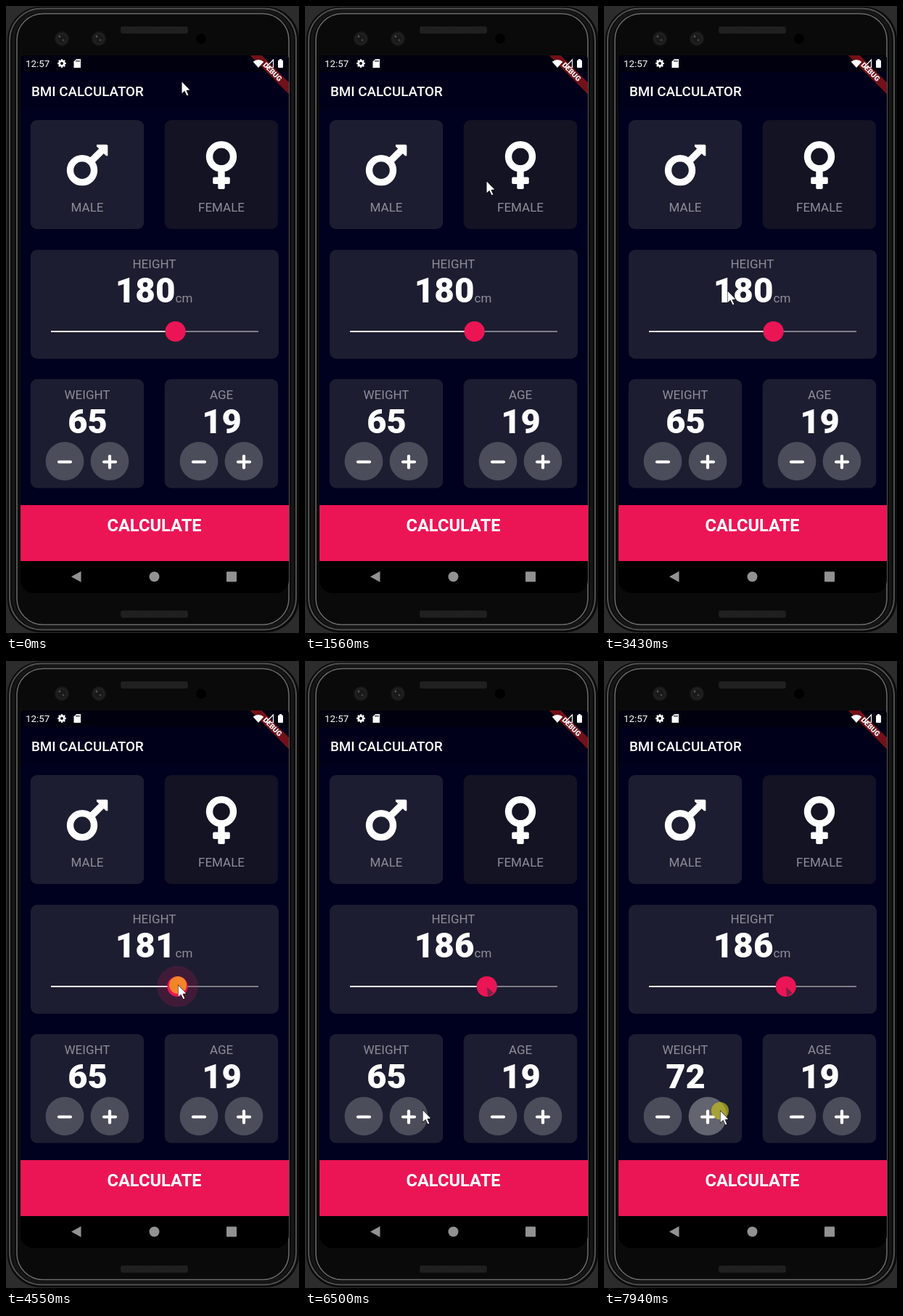
Recreate the animation shown at these times as an HTML page with a canvas. Size 404 px wide and 863 px high, loop 8000 ms.

```html
<!DOCTYPE html>
<html lang="en">
<head>
<meta charset="utf-8">
<title>BMI Calculator</title>
<style>
html, body { margin: 0; width: 100%; height: 100%; overflow: hidden; background: #2c2c2d; }
canvas { display: block; width: 404px; height: 863px; }
</style>
</head>
<body>
<canvas id="stage" width="404" height="863"></canvas>
<script>
const ctx = document.getElementById('stage').getContext('2d');
const LOOP = 8000, TAU = Math.PI * 2;
const PINK = '#eb1555', CARD = '#1d1d31', GREY = '#8d8e98', WHITE = '#fff', BAR = '#00000f';
const LEFT = 112, MID = 204.5, RIGHT = 297;
const TRACK = { from: 62, to: 348, y: 448, min: 120, max: 220 };
const PRESS = 4310, RELEASE = 5790, FIRST_TAP = 6680, TAP_GAP = 190;

// Pointer moves: start time, end time, x, y
const START = [242, 104];
const MOVES = [
  [260, 1090, 121, 232], [1110, 1380, 306, 198], [1380, 1560, 250, 241],
  [1600, 1790, 262, 250], [1900, 2340, 146, 251], [3120, 3430, 170, 392],
  [3430, 3990, 229, 436], [4100, 4240, 232, 446], [4400, 4550, 237, 446],
  [4650, 5100, 247, 447], [5410, 5640, 251, 447], [5960, 6500, 162, 618],
  [6500, 6820, 160, 619]
];

const clamp = v => Math.max(0, Math.min(1, v));
const ease = k => k * k * (3 - 2 * k);

function pointer(t) {
  let [x, y] = START;
  for (const [from, to, nx, ny] of MOVES) {
    const k = ease(clamp((t - from) / (to - from)));
    x += (nx - x) * k;
    y += (ny - y) * k;
  }
  return [Math.round(x), Math.round(y)];
}

function box(x, y, w, h, r, fill) {
  ctx.beginPath();
  ctx.roundRect(x, y, w, h, r);
  ctx.fillStyle = fill;
  ctx.fill();
}

function disc(x, y, r, fill) {
  ctx.beginPath();
  ctx.arc(x, y, r, 0, TAU);
  ctx.fillStyle = fill;
  ctx.fill();
}

function ring(x, y, r, width, color) {
  ctx.beginPath();
  ctx.arc(x, y, r, 0, TAU);
  ctx.lineWidth = width;
  ctx.strokeStyle = color;
  ctx.stroke();
}

function trace(points) {
  ctx.beginPath();
  points.forEach(([x, y]) => ctx.lineTo(x, y));
  ctx.closePath();
}

function poly(points, fill) {
  trace(points);
  ctx.fillStyle = fill;
  ctx.fill();
}

function line(x0, y0, x1, y1, width, color, cap = 'butt') {
  ctx.beginPath();
  ctx.moveTo(x0, y0);
  ctx.lineTo(x1, y1);
  ctx.lineWidth = width;
  ctx.strokeStyle = color;
  ctx.lineCap = cap;
  ctx.stroke();
}

function text(str, x, y, size, weight = 400, color = WHITE, align = 'center') {
  ctx.font = `${weight} ${size}px Roboto, sans-serif`;
  ctx.textAlign = align;
  ctx.fillStyle = color;
  ctx.fillText(str, x, y);
}

const label = (str, x, y) => text(str, x, y, 17, 400, GREY);
const card = (x, y, fill = CARD, w = 156.5) => box(x - w / 2, y, w, 150, 9, fill);

function placed(x, y, scale, paint) {
  ctx.save();
  ctx.translate(x, y);
  ctx.scale(scale, scale);
  paint();
  ctx.restore();
}

function edge(inset, color, width) {
  ctx.beginPath();
  ctx.roundRect(inset, inset * 0.7, 405 - inset * 2, 862 - inset * 1.4, 48 - inset * 0.8);
  ctx.strokeStyle = color;
  ctx.lineWidth = width;
  ctx.stroke();
}

function grille(y) {
  box(158, y, 93, 10, 3, '#1d1d1d');
  for (let x = 160; x < 250; x += 3) line(x, y + 1, x + 2, y + 9, 0.7, '#2b2b2b');
}

function lens(x) {
  disc(x, 45, 10, '#191919');
  ring(x, 45, 7, 1.5, '#242424');
  disc(x - 3, 42, 1.4, '#555');
  disc(x + 2, 47, 1.4, '#444');
}

function phone() {
  ctx.fillStyle = '#2c2c2d';
  ctx.fillRect(0, 0, 404, 863);
  box(2, 1, 402, 861, 46, '#0a0a0a');
  edge(5, '#505050', 2);
  edge(10, '#161616', 4);
  edge(15, '#6c6c6c', 1.5);
  grille(28);
  grille(832);
  lens(77);
  lens(128);
  disc(269, 45, 7, '#000');
  box(20, 68, 370, 740, [5, 5, 18, 18], '#000');
  box(20, 91, 370, 673, 0, '#00001f');
  box(20, 91, 370, 52, 0, '#00001b');
  box(20, 68, 370, 23, [5, 5, 0, 0], BAR);
}

function banner() {
  ctx.save();
  ctx.beginPath();
  ctx.rect(20, 68, 370, 740);
  ctx.clip();
  ctx.translate(390, 68);
  ctx.rotate(Math.PI / 4);
  ctx.fillStyle = 'rgba(183, 28, 28, 0.63)';
  ctx.fillRect(-40, 26.4, 80, 11.3);
  text('DEBUG', 0, 35.3, 10, 900);
  ctx.restore();
}

function statusBar() {
  text('12:57', 27, 83.7, 13.3, 400, WHITE, 'left');
  for (let i = 0; i < 8; i++) {
    const a = i * TAU / 8;
    line(77, 79, 77 + 5.8 * Math.cos(a), 79 + 5.8 * Math.sin(a), 2.4, WHITE);
  }
  disc(77, 79, 4.6, WHITE);
  disc(77, 79, 2, BAR);
  poly([[97, 73], [103, 73], [103, 85], [93.5, 85], [93.5, 76.5]], WHITE);
  for (let x = 97; x < 102; x += 2) line(x, 74.5, x, 77, 1, BAR);
  ctx.beginPath();
  ctx.moveTo(348, 85);
  ctx.arc(348, 85, 11, -TAU * 0.365, -TAU * 0.135);
  ctx.fillStyle = WHITE;
  ctx.fill();
  trace([[358.5, 84.5], [368.5, 74], [368.5, 84.5]]);
  ctx.lineWidth = 1.2;
  ctx.strokeStyle = WHITE;
  ctx.stroke();
  box(375, 74.5, 7, 10.5, 1, WHITE);
  box(377, 73, 3, 2, 0, WHITE);
}

// Both icons live on a 512-unit grid
function maleIcon() {
  ring(144, 304, 112, 64, WHITE);
  line(215, 233, 340, 108, 64, WHITE);
  poly([[280, 64], [376, 64], [384, 72], [384, 168], [368, 168], [280, 80]], WHITE);
}

function femaleIcon() {
  ring(144, 176, 112, 64, WHITE);
  box(112, 300, 64, 180, 12, WHITE);
  box(64, 368, 160, 64, 12, WHITE);
}

function genders() {
  card(LEFT, 157);
  card(RIGHT, 157, '#131324');
  placed(83.8, 181.4, 0.1472, maleIcon);
  placed(275.8, 181.4, 0.1472, femaleIcon);
  label('MALE', LEFT, 283);
  label('FEMALE', RIGHT, 283);
}

function roundButton(x, plus, fill = '#4b4d5a') {
  disc(x, 626.5, 26.4, fill);
  line(x - 8, 627.5, x + 8, 627.5, 4.2, WHITE, 'round');
  if (plus) line(x, 619.5, x, 635.5, 4.2, WHITE, 'round');
}

function counter(x, name, value, plusFill) {
  card(x, 513.5);
  label(name, x, 541);
  text(value, x + 0.4, 588, 47, 900);
  roundButton(x - 31, false);
  roundButton(x + 31, true, plusFill);
}

function slider(t, x) {
  const { from, to, y, min, max } = TRACK;
  const perUnit = (to - from) / (max - min);
  const dragX = t < PRESS ? (from + to) / 2 + perUnit * 10 : x;
  const value = t < PRESS ? 180 : Math.round((dragX - from - 1) / perUnit) + min;
  return { value, thumb: from + (value - min) * perUnit };
}

function heightCard(t, x) {
  const { from, to, y } = TRACK;
  const { value, thumb } = slider(t, x);
  card(MID + 0.5, 335.5, CARD, 342);
  label('HEIGHT', MID, 361);
  text(value, 233.5, 408, 47.6, 900, WHITE, 'right');
  text('cm', 233.5, 408, 17, 400, GREY, 'left');
  line(from, y, to, y, 2, '#7c7d87');
  line(from, y, thumb, y, 2, WHITE);
  const halo = clamp((t - PRESS) / 140) * clamp((RELEASE + 80 - t) / 80);
  disc(thumb, y, 28.3 * halo, 'rgba(235, 21, 85, 0.17)');
  disc(thumb, y, 14.1, PINK);
  if (t >= 6020) poly([[251, 449], [260, 457], [252, 462]], '#7d2044');
}

function cursor() {
  trace([[0.5, 1], [0.5, 15.5], [4, 12.3], [6.9, 18.4], [8.7, 17.5], [6, 11.5], [10.5, 11.2]]);
  ctx.lineWidth = 1;
  ctx.strokeStyle = '#000';
  ctx.stroke();
  ctx.fillStyle = WHITE;
  ctx.fill();
}

function tapMark(t, x, y) {
  const tapping = (t >= 2730 && t < 2880) ||
    (t >= FIRST_TAP && (t - FIRST_TAP) % TAP_GAP < 130);
  if (t >= PRESS && t < RELEASE) disc(x, y, 12, 'rgba(248, 200, 15, 0.63)');
  else if (tapping) disc(x, y, 12, 'rgba(207, 198, 20, 0.63)');
}

function navBar() {
  const y = 785.5, fill = '#929292';
  poly([[90, y], [103.5, y - 7.5], [103.5, y + 7.5]], fill);
  disc(MID, y, 7, fill);
  box(304, y - 7, 14, 14, 1, fill);
}

function draw(t) {
  const [x, y] = pointer(t);
  const taps = Math.max(0, Math.ceil((t - FIRST_TAP - 60) / TAP_GAP));
  // The slider keeps its last dragged place after release
  const dragX = t < RELEASE ? x : pointer(RELEASE)[0];
  phone();
  text('BMI CALCULATOR', 35, 124, 18.8, 500, WHITE, 'left');
  banner();
  statusBar();
  genders();
  heightCard(t, dragX);
  counter(LEFT, 'WEIGHT', 65 + taps, t >= 7780 ? '#62646f' : undefined);
  counter(RIGHT, 'AGE', 19);
  box(20, 687, 370, 77, 0, PINK);
  text('CALCULATE', MID, 723, 23.7, 700);
  navBar();
  tapMark(t, x, y);
  placed(x, y - 0.5, 1.08, cursor);
}

const start = performance.now();
function tick() {
  draw((performance.now() - start) % LOOP);
  requestAnimationFrame(tick);
}
tick();
</script>
</body>
</html>
```
